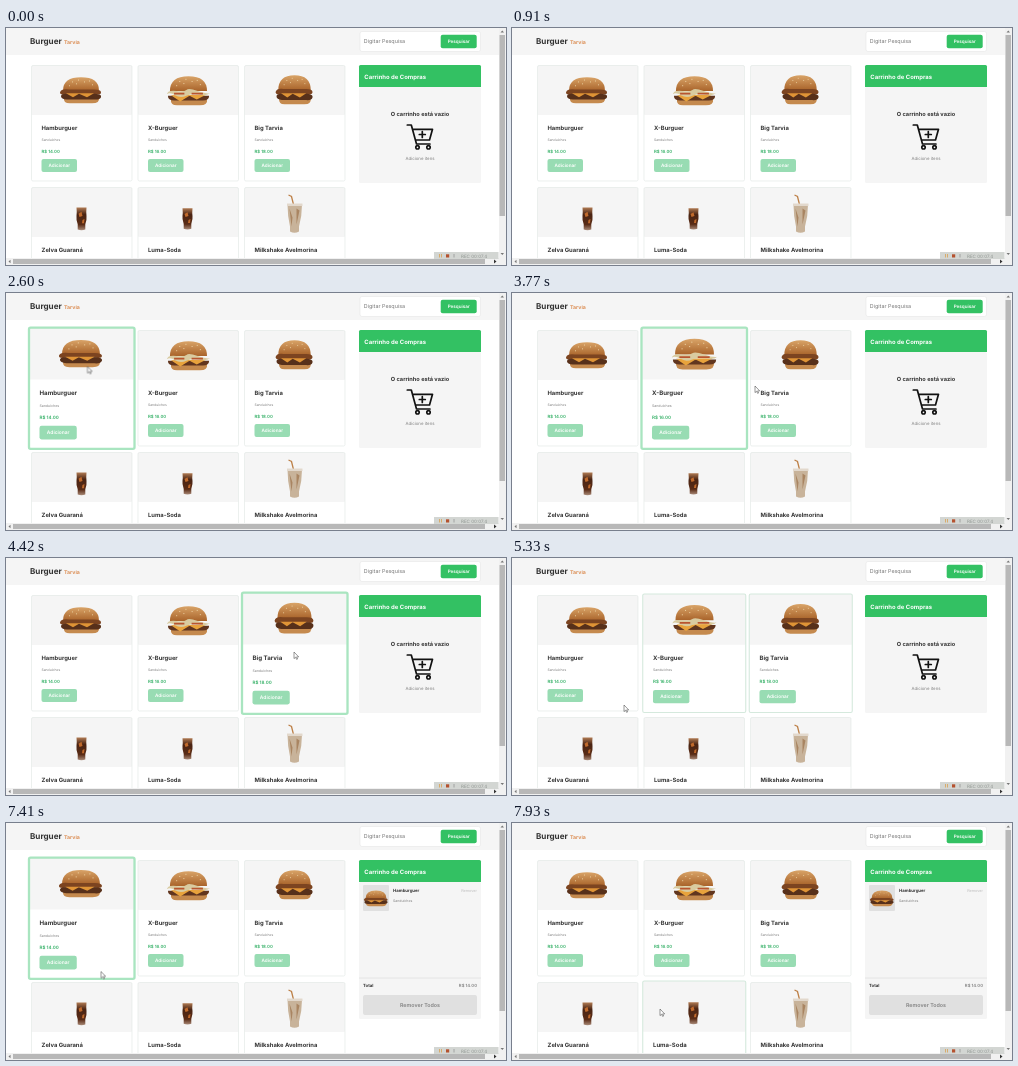
An HTML page that plays this animation: 500 by 237 pixels, repeating every 8000 ms.

```html
<!DOCTYPE html>
<html lang="pt-BR">
<head>
<meta charset="utf-8">
<title>Burguer</title>
<style>
  html, body { margin: 0; width: 100%; height: 100%; overflow: hidden; background: #fff; }
  svg { display: block; width: 500px; height: 237px; font-family: Inter, sans-serif; text-rendering: geometricPrecision; }

  @property --h { syntax: "<number>"; inherits: true; initial-value: 0; }
  @property --b { syntax: "<number>"; inherits: true; initial-value: 0; }

  .card, .buy, #arrow, #hand, #empty, #full {
    animation: none 8000ms step-end -4ms infinite;
  }
  .card {
    transform-origin: 50.25px 57.5px;
    transform: scale(calc(1 + .05 * var(--h)));
  }
  .frame {
    fill: none;
    stroke: color-mix(in srgb, #a9e5c0 calc(100% * var(--h) * var(--h)), #e4eae7);
    stroke-width: calc(.7px + 1.5px * var(--h) * var(--h));
  }
  .buy { fill: color-mix(in srgb, #2fbd60 calc(100% * var(--b)), #98dcb3); }

  #card0 { animation-name: hover0; }
  #card1 { animation-name: hover1; }
  #card2 { animation-name: hover2; }
  #card4 { animation-name: hover4; }
  #card5 { animation-name: hover5; }
  #card0 .buy { animation-name: press; }
  #arrow { animation-name: move, arrow; }
  #hand { animation-name: hand; }
  #empty { animation-name: empty; }
  #full { animation-name: full; }

  @keyframes hover0 {
    24.375% { --h: 0; animation-timing-function: steps(3); }
    29.25% { --h: 1; }
    35.75% { --h: 1; animation-timing-function: steps(3); }
    40.625% { --h: 0; }
    66.625% { --h: 0; animation-timing-function: steps(3); }
    71.5% { --h: 1; }
    94.25% { --h: 1; animation-timing-function: steps(3); }
    99.125%, 100% { --h: 0; }
  }
  @keyframes hover1 {
    37.375% { --h: 0; animation-timing-function: steps(3); }
    42.25% { --h: 1; }
    47.125% { --h: 1; animation-timing-function: steps(3); }
    52% { --h: 0; }
    63.375% { --h: 0; animation-timing-function: steps(2); }
    66.625% { --h: .5; animation-timing-function: steps(2); }
    69.875%, 100% { --h: 0; }
  }
  @keyframes hover2 {
    47.125% { --h: 0; animation-timing-function: steps(3); }
    52% { --h: 1; }
    63.375% { --h: 1; animation-timing-function: steps(4); }
    69.875%, 100% { --h: 0; }
  }
  @keyframes hover4 {
    95.875% { --h: 0; animation-timing-function: steps(2); }
    99.125%, 100% { --h: .5; }
  }
  @keyframes hover5 {
    19.5% { --h: 0; animation-timing-function: steps(2); }
    22.75% { --h: .5; animation-timing-function: steps(2); }
    26%, 100% { --h: 0; }
  }
  @keyframes press {
    73.125% { --b: 0; animation-timing-function: steps(2); }
    76.375% { --b: 1; }
    89.375% { --b: 1; animation-timing-function: steps(2); }
    92.625%, 100% { --b: 0; }
  }
  @keyframes move {
    0% { transform: translate(-20px, -20px); }
    16.25% { transform: translate(420px, 220px); animation-timing-function: steps(2); }
    19.5% { transform: translate(244px, 174.5px); animation-timing-function: steps(4); }
    26% { transform: translate(74px, 84px); }
    32.5% { transform: translate(81.5px, 73.5px); animation-timing-function: steps(9); }
    47.125% { transform: translate(243px, 93px); animation-timing-function: steps(3); }
    52% { transform: translate(285px, 96px); }
    55.25% { transform: translate(288px, 94px); }
    63.375% { transform: translate(230px, 112px); animation-timing-function: steps(2); }
    66.625% { transform: translate(112px, 147px); animation-timing-function: steps(3); }
    71.5% { transform: translate(62px, 141px); }
    73.125% { transform: translate(56px, 139px); }
    89.375% { transform: translate(62px, 141px); animation-timing-function: steps(4); }
    95.875% { transform: translate(128px, 156px); animation-timing-function: steps(2); }
    99.125%, 100% { transform: translate(148px, 186px); }
  }
  @keyframes arrow { 0%, 89.375%, 100% { opacity: 1; } 73.125% { opacity: 0; } }
  @keyframes hand { 0%, 89.375%, 100% { opacity: 0; } 73.125% { opacity: 1; } }
  @keyframes empty { 0% { opacity: 1; } 81.25%, 100% { opacity: 0; } }
  @keyframes full { 0% { opacity: 0; } 81.25%, 100% { opacity: 1; } }
</style>
</head>
<body>
<svg viewBox="0 0 500 237">
  <defs>
    <linearGradient id="bun" x2="0" y2="1">
      <stop stop-color="#d9a468"/>
      <stop offset="1" stop-color="#a9642b"/>
    </linearGradient>
    <linearGradient id="cola" x2="0" y2="1">
      <stop stop-color="#b07a52"/>
      <stop offset=".3" stop-color="#4a2413"/>
      <stop offset=".75" stop-color="#5a2c16"/>
      <stop offset="1" stop-color="#a98a78"/>
    </linearGradient>
    <g id="bread">
      <path d="M-17 7H18Q19 13.500 11 13.500H-11Q-18 13.500 -17 7Z" fill="#c58a4e"/>
      <path d="M-18 0Q-18 -14 0 -14T18 0Z" fill="url(#bun)"/>
      <path d="M-9 -9h1M-3 -11h1M3 -9h1M8 -10h1M-5 -7h1M11 -6h1M-12 -5h1" stroke="#f3dcae" stroke-width=".8"/>
    </g>
    <g id="burger">
      <use href="#bread"/>
      <path d="M-21 2Q-20 -2 -12 -1H13Q20 -1 20 2T14 4H-15Q-21 5 -21 2Z" fill="#7c4420"/>
      <path d="M-20 6Q-20 3 -13 3.500H14Q21 4 20 7T13 9.500H-14Q-20 9 -20 6Z" fill="#57301a"/>
      <path d="M-15 3L-8 7L-2 3.500L6 7L13 3Z" fill="#df9436"/>
    </g>
    <g id="deluxe">
      <use href="#bread"/>
      <path d="M-20 4.500H20Q20 9 14 9H-14Q-20 9 -20 4.500Z" fill="#61361f"/>
      <path d="M-17 4L-8 10L1 4.500L8 8L17 3.500Z" fill="#e8a33c"/>
      <path d="M-21 3Q-20 -1 -12 0T-2 -1T9 0T21 2Q18 5 11 3.500T-2 4.500T-13 4T-21 3Z" fill="#d9cba0"/>
      <path d="M-14 2.500H-4M3 2.500H14" stroke="#b8552f" stroke-width="1.500"/>
    </g>
    <g id="drink">
      <path d="M-5 -11H5Q4.500 -6 5 -3T3.800 5V10Q0 11.500 -3.800 10V5Q-5.500 0 -5 -3T-5 -11Z" fill="url(#cola)"/>
      <path d="M-3 -5l3 -2 1 4 -3 1zM1 1l2 -1 -.500 4 -2 0z" fill="#c06a2c"/>
    </g>
    <g id="shake">
      <path d="M-1 -14L-3 -22L-6 -23.500" fill="none" stroke="#bd8048" stroke-width="1.300"/>
      <path d="M-7 -14H7.500Q7.500 -3 4.500 8V13Q0 15.500 -4.500 13V8Q-7 -3 -7 -14Z" fill="#c8b39a"/>
      <path d="M-7.500 -15H8V-12.500H-7.500Z" fill="#e2d8cc"/>
      <path d="M-5 -10l3 9 -1 9zM2 -10l3 2 -3 14z" fill="#a98562"/>
    </g>
  </defs>

  <rect width="500" height="237" fill="#fff"/>
  <rect width="493" height="27" fill="#f5f5f5"/>
  <g font-weight="700">
    <text x="24" y="15.700" font-size="8.100" fill="#333">Burguer</text>
    <text x="58" y="15.700" font-size="5.200" fill="#dc9058">Tarvia</text>
  </g>
  <rect x="354" y="3.500" width="120.500" height="20" rx="2" fill="#fff" stroke="#e6e6e6" stroke-width=".6"/>
  <text x="357.800" y="15.200" font-size="5.400" fill="#777">Digitar Pesquisa</text>
  <rect x="434.700" y="6.700" width="36" height="13.500" rx="2" fill="#33c163"/>
  <text x="452.700" y="15.200" font-size="4.600" font-weight="600" fill="#fff" text-anchor="middle">Pesquisar</text>

  <g id="cards"></g>

  <g id="empty">
    <rect x="353" y="59" width="122" height="96" rx="1.500" fill="#f5f5f5"/>
    <text x="414" y="88" font-size="5.650" font-weight="700" fill="#333" text-anchor="middle">O carrinho está vazio</text>
    <g fill="none" stroke="#111" stroke-width="1.700" stroke-linejoin="round" stroke-linecap="round">
      <path d="M401.300 97H405.300L410.500 116H424M406.500 101.300H426.500L423.500 112H409.500M416.300 103.500V109.500M413.300 106.500H419.300"/>
      <circle cx="411.500" cy="119.300" r="1.700"/>
      <circle cx="422.500" cy="119.300" r="1.700"/>
    </g>
    <text x="414" y="131.500" font-size="4.350" fill="#828282" text-anchor="middle">Adicione itens</text>
  </g>

  <g id="full">
    <rect x="353" y="59" width="122" height="137" rx="1.500" fill="#f5f5f5"/>
    <path d="M353 155H475" stroke="#e0e0e0" stroke-width=".8"/>
    <rect x="357" y="62" width="26" height="26" rx="1" fill="#e0e0e0"/>
    <use href="#burger" transform="translate(370 75.500) scale(.58)"/>
    <text x="387" y="69" font-size="4.300" font-weight="700" fill="#333">Hamburguer</text>
    <text x="387" y="79" font-size="3.500" fill="#828282">Sanduíches</text>
    <text x="471" y="68.500" font-size="3.800" fill="#bdbdbd" text-anchor="end">Remover</text>
    <text x="357" y="164" font-size="4.300" font-weight="700" fill="#333">Total</text>
    <text x="471" y="164" font-size="4.300" font-weight="600" fill="#828282" text-anchor="end">R$ 14.00</text>
    <rect x="357" y="172" width="114" height="20" rx="2" fill="#e0e0e0"/>
    <text x="414" y="184" font-size="5.350" font-weight="600" fill="#828282" text-anchor="middle">Remover Todos</text>
  </g>

  <path d="M353 59V38.500Q353 37 354.500 37H473.500Q475 37 475 38.500V59Z" fill="#33c163"/>
  <text x="358.300" y="50.700" font-size="5.950" font-weight="700" fill="#fff">Carrinho de Compras</text>

  <g id="scrollbars">
    <path d="M493 0H500V237H0V230H493Z" fill="#f1f1f1"/>
    <rect x="493.500" y="7" width="5.500" height="181" fill="#b8b8b8"/>
    <rect x="7" y="231" width="472" height="5" fill="#b8b8b8"/>
    <path d="M494.500 4.500L496.300 2.500L498 4.500ZM494.500 225L496.300 227L498 225ZM4.500 231.800V235.200L2.500 233.500Z" fill="#777"/>
    <path d="M488 231.500V235.500L490.500 233.500Z" fill="#333"/>
  </g>
  <g id="recorder">
    <rect x="428" y="224" width="64.500" height="7" fill="#d3d6d3"/>
    <path d="M433.500 226V229.500M435.500 226V229.500" stroke="#d8a860" stroke-width=".9"/>
    <rect x="440" y="226.300" width="3.200" height="3.200" fill="#b5522f"/>
    <path d="M448 226V229.500" stroke="#999" stroke-width=".8"/>
    <text x="455" y="229.500" font-size="4.500" fill="#8e9490">REC 00:07.4</text>
  </g>

  <g id="arrow">
    <path d="M0 0V6.600L1.600 5.200L2.600 7.400L3.600 7L2.600 4.900H4.700Z" fill="#fff" stroke="#444" stroke-width=".55"/>
  </g>
  <g id="hand">
    <path transform="translate(56 138.500)" d="M0 0.500Q.8 -.4 1.500 .5V3L4.500 3.700Q5.200 4 5 5L4.300 8H.7L-1.600 5Q-1.500 4 0 4.800Z" fill="#fff" stroke="#222" stroke-width=".55"/>
  </g>
</svg>
<script>
  const snack = 'Sanduíches', soda = 'Bebidas';
  // name, kind, price, art, centre x and y, scale x and y
  const items = [
    ['Hamburguer', snack, 14, 'burger', 49.5, 25, 1, .95],
    ['X-Burguer', snack, 16, 'deluxe', 50.5, 25.5, 1.03, 1.06],
    ['Big Tarvia', snack, 18, 'burger', 50, 24.5, .9, 1.06],
    ['Zelva Guaraná', soda, 5, 'drink', 50, 31.5, 1, 1.04],
    ['Luma-Soda', soda, 5, 'drink', 49.5, 31.5, 1, .98],
    ['Milkshake Avelmorina', soda, 5, 'shake', 50, 31, 1, 1]
  ];

  const text = (x, y, size, weight, fill, str, more = '') =>
    `<text x="${x}" y="${y}" font-size="${size}" font-weight="${weight}" fill="${fill}" ${more}>${str}</text>`;

  const card = ([name, kind, price, art, x, y, sx, sy], i) => `
    <g transform="translate(${25.5 + i % 3 * 106.5} ${i < 3 ? 37.5 : 159.5})">
      <g class="card" id="card${i}">
        <rect width="100.5" height="115.5" rx="1.5" fill="#fff"/>
        <rect width="100.5" height="49.4" rx="1" fill="#f5f5f5"/>
        <rect class="frame" width="100.5" height="115.5" rx="1.5"/>
        <use href="#${art}" transform="translate(${x} ${y}) scale(${sx} ${sy})"/>
        ${text(10, 64.2, 5.85, 700, '#333', name)}
        ${text(10, 75.2, 3.4, 400, '#828282', kind)}
        ${text(10, 87, 4.35, 600, '#2fae62', `R$ ${price}.00`)}
        <rect class="buy" x="10" y="93.5" width="35.5" height="13" rx="2"/>
        ${text(27.8, 101.7, 4.65, 600, '#fff', 'Adicionar', 'text-anchor="middle"')}
      </g>
    </g>`;

  document.getElementById('cards').innerHTML = items.map(card).join('');
</script>
</body>
</html>
```
